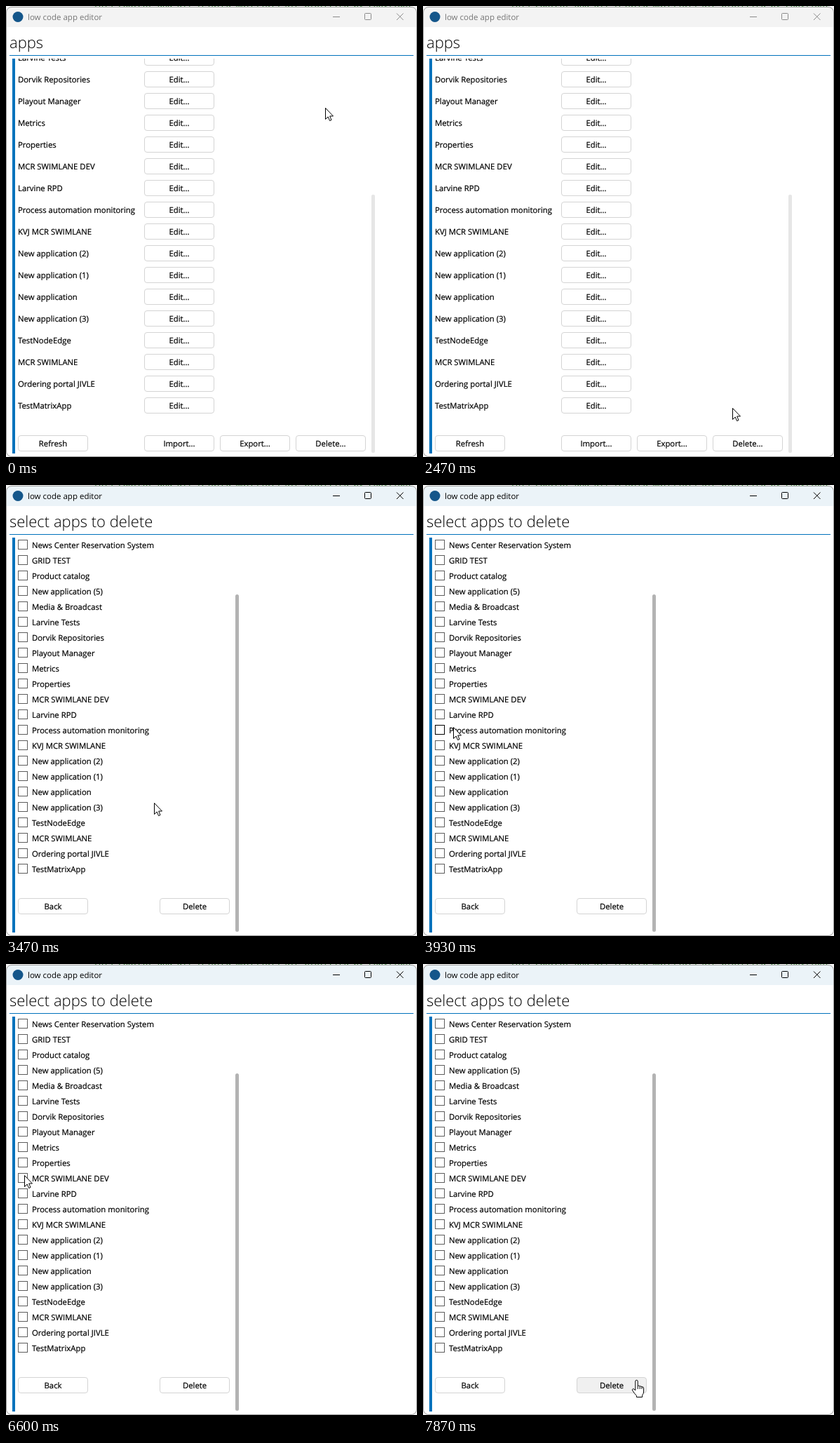
Write an HTML page that moves like this. It is 586x643 px and loops after 8 s.

```html
<!DOCTYPE html>
<html lang="en">
<head>
<meta charset="utf-8">
<title>low code app editor</title>
<style>
  html, body { margin: 0; width: 100%; height: 100%; overflow: hidden; background: #fff; }
  svg { display: block; width: 100%; height: 100%; }
  text { font: 11.35px "Open Sans", "Noto Sans", sans-serif; text-rendering: geometricPrecision; white-space: pre; }
  .label, .mid { stroke: #000; stroke-width: .2; }
  .mid { text-anchor: middle; }
  .heading { font-size: 22px; font-weight: 300; }
  .title { font-size: 11.5px; }
  .code { font: 11.67px "Noto Sans Mono", "Liberation Mono", monospace; fill: #2e8b32; }
  .button { fill: #fff; stroke: #d4d4d4; }
  .box { fill: #fff; stroke: #5c5c5c; }
  .tick { fill: none; stroke: #444; stroke-width: 1.5; }
  .pointer { fill: #fff; stroke: #000; stroke-linejoin: round; }
</style>
</head>
<body>
<svg id="stage" viewBox="0 0 586 643"></svg>
<script>
const LOOP = 8000, STEP = 200 / 3;
const ACTIVATED = 2930, OPENED = 3000, PRESS_LENGTH = 140;
const BLUE = '#0072bc';

const shared = ['Larvine Tests', 'Dorvik Repositories', 'Playout Manager', 'Metrics', 'Properties',
  'MCR SWIMLANE DEV', 'Larvine RPD', 'Process automation monitoring', 'KVJ MCR SWIMLANE',
  'New application (2)', 'New application (1)', 'New application', 'New application (3)',
  'TestNodeEdge', 'MCR SWIMLANE', 'Ordering portal JIVLE', 'TestMatrixApp'];
const selectable = ['News Center Reservation System', 'GRID TEST', 'Product catalog',
  'New application (5)', 'Media & Broadcast', ...shared];

const home = { x: 455, y: 145 };
const moves = [
  { from: 10, until: 270, x: 544, y: 472 },
  { from: 1530, until: 1930, x: 420, y: 522 },
  { from: 2270, until: 2670, x: 464, y: 626 },
  { from: 3070, until: 3730, x: 74, y: 360 },
  { from: 3740, until: 3930, x: 43, y: 345 },
  { from: 3930, until: 4330, x: 23, y: 312 },
  { from: 5010, until: 5400, x: 26, y: 331 },
  { from: 6200, until: 6600, x: 26, y: 301 },
  { from: 6610, until: 6870, x: 179, y: 476 },
  { from: 6880, until: 7130, x: 138, y: 528 },
  { from: 7130, until: 7730, x: 264, y: 594 },
  { from: 7740, until: 7870, x: 304, y: 593 }
];
const presses = [
  { at: 4600, name: 'MCR SWIMLANE DEV' },
  { at: 5600, name: 'Larvine RPD' },
  { at: 6060, name: 'Larvine RPD' },
  { at: 6510, name: 'MCR SWIMLANE DEV' }
];

const stage = document.getElementById('stage');

function add(parent, tag, attrs = {}, content) {
  const node = document.createElementNS('http://www.w3.org/2000/svg', tag);
  for (const key in attrs) node.setAttribute(key, attrs[key]);
  if (content !== undefined) node.textContent = content;
  return parent.appendChild(node);
}
const label = (parent, x, y, content, kind = 'label') =>
  add(parent, 'text', { x, y, class: kind }, content);
const rect = (parent, x, y, width, height, attrs) =>
  add(parent, 'rect', { x, y, width, height, ...attrs });
const show = (node, visible) => node.setAttribute('display', visible ? 'inline' : 'none');

function button(parent, x, y, caption) {
  const face = rect(parent, x + .5, y + .5, 99, 22, { rx: 3.5, class: 'button' });
  label(parent, x + 50, y + 15.5, caption, 'mid');
  return face;
}

// Strip of the document behind the window
rect(stage, 0, 0, 586, 643, { fill: '#f4f4f4' });
label(stage, 125, 1.5, 'this content and all related materials are protected by copyright', 'code');

// Window frame
rect(stage, .5, 1.5, 585, 641, { rx: 7.5, fill: '#fff' });
const titleBar = add(stage, 'path', { d: 'M1 30V9a7 7 0 0 1 7-7H578a7 7 0 0 1 7 7V30Z' });
rect(stage, .5, 1.5, 585, 641, { rx: 7.5, fill: 'none', stroke: '#9d9d9d' });
add(stage, 'circle', { cx: 17, cy: 15.5, r: 7.5, fill: '#14568a' });
const title = label(stage, 31, 20, 'low code app editor', 'title');
const controls = add(stage, 'g', { fill: 'none' });
add(controls, 'path', { d: 'M466 15.5h10M557 10.5l9.5 9.5m0-9.5l-9.5 9.5' });
rect(controls, 511.5, 10.5, 9, 9, { rx: 1 });
const heading = label(stage, 5, 60, '', 'heading');
rect(stage, 5, 70, 576, 1, { fill: BLUE });
rect(stage, 9, 75, 4, 563, { fill: BLUE });

const clip = add(stage, 'clipPath', { id: 'content' });
rect(clip, 0, 75, 586, 566);
const screen = () => add(stage, 'g', { 'clip-path': 'url(#content)' });

// Overview of all apps
const overview = screen();
shared.forEach((name, i) => {
  const y = 62 + 31 * i;
  label(overview, 17, y + 15.5, name);
  button(overview, 197, y, 'Edit...');
});
button(overview, 17, 612, 'Refresh');
['Import...', 'Export...', 'Delete...'].forEach((caption, i) =>
  button(overview, 197 + 108 * i, 612, caption));
const overviewScroll = rect(overview, 521, 269, 5, 368, { rx: 2, fill: '#e6e6e6' });

// Selection of apps to delete
const selection = screen();
const rows = selectable.map((name, i) => {
  const y = 85 + 22 * i;
  const box = rect(selection, 17.5, y - 6.5, 13, 13, { class: 'box' });
  const tick = add(selection, 'path', { d: `M20.5 ${y}l2.8 3 5-6`, class: 'tick' });
  label(selection, 37, y + 4.8, name);
  return { name, y, box, tick, end: 37 + name.length * 6 };
});
button(selection, 17, 589, 'Back');
const deleteButton = button(selection, 219, 589, 'Delete');
rect(selection, 327, 156, 5, 481, { rx: 2.5, fill: '#b3b3b3' });

// Pointers, both with the tip at the origin
const arrow = add(stage, 'path', {
  class: 'pointer', d: 'M.5.5V16.5L4.2 13 6.6 18.6 9 17.5 6.7 12H11.5Z'
});
const hand = add(stage, 'g');
add(hand, 'path', {
  class: 'pointer',
  d: 'M-1.2 15V2a1.7 1.7 0 0 1 3.4 0V8.5q1.6-1 3 .6 1.6-.8 2.8.8 2.6-.5 2.6 2V17q0 2.5-2 4.8V24.5H.5V22.5Q-2.5 19.5-5.3 15q-.8-1.8.6-2.3 1.6-.4 3.5 2.3Z'
});
add(hand, 'path', { d: 'M2.2 8.5V13m3-3.8V13m2.8-3V13', stroke: '#000', fill: 'none' });

const ease = k => k * k * (3 - 2 * k);

function pointerAt(t) {
  let { x, y } = home;
  for (const move of moves) {
    if (t <= move.from) break;
    const k = ease(Math.min(1, (t - move.from) / (move.until - move.from)));
    x += (move.x - x) * k;
    y += (move.y - y) * k;
  }
  return [Math.round(x), Math.round(y)];
}

function render(time) {
  const t = Math.floor((time % LOOP + 4) / STEP) * STEP;
  const [x, y] = pointerAt(t);
  const active = t >= ACTIVATED, opened = t >= OPENED;

  titleBar.setAttribute('fill', active ? '#ebf3f8' : '#f3f3f3');
  title.setAttribute('fill', active ? '#000' : '#777');
  controls.setAttribute('stroke', active ? '#000' : '#8b8b8b');
  heading.textContent = opened ? 'select apps to delete' : 'apps';
  show(overview, !opened);
  show(selection, opened);
  show(overviewScroll, x < 527);

  for (const row of rows) {
    const ages = presses.filter(press => press.name === row.name).map(press => t - press.at);
    const pressed = ages.some(age => age >= 0 && age < PRESS_LENGTH);
    const toggles = ages.filter(age => age >= PRESS_LENGTH / 2).length;
    const hovered = Math.abs(y - row.y) <= 11 && x >= 17 && x <= row.end;
    row.box.style.stroke = hovered && !pressed ? '#000' : '';
    show(row.tick, toggles % 2);
  }

  const onDelete = opened && x >= 219 && x < 319 && y >= 589 && y < 612;
  deleteButton.style.fill = onDelete ? '#f0f0f0' : '';
  show(arrow, !onDelete);
  show(hand, onDelete);
  (onDelete ? hand : arrow).setAttribute('transform', `translate(${x} ${y})`);
}

const start = performance.now();
function frame() {
  render(performance.now() - start);
  requestAnimationFrame(frame);
}
frame();
</script>
</body>
</html>
```
